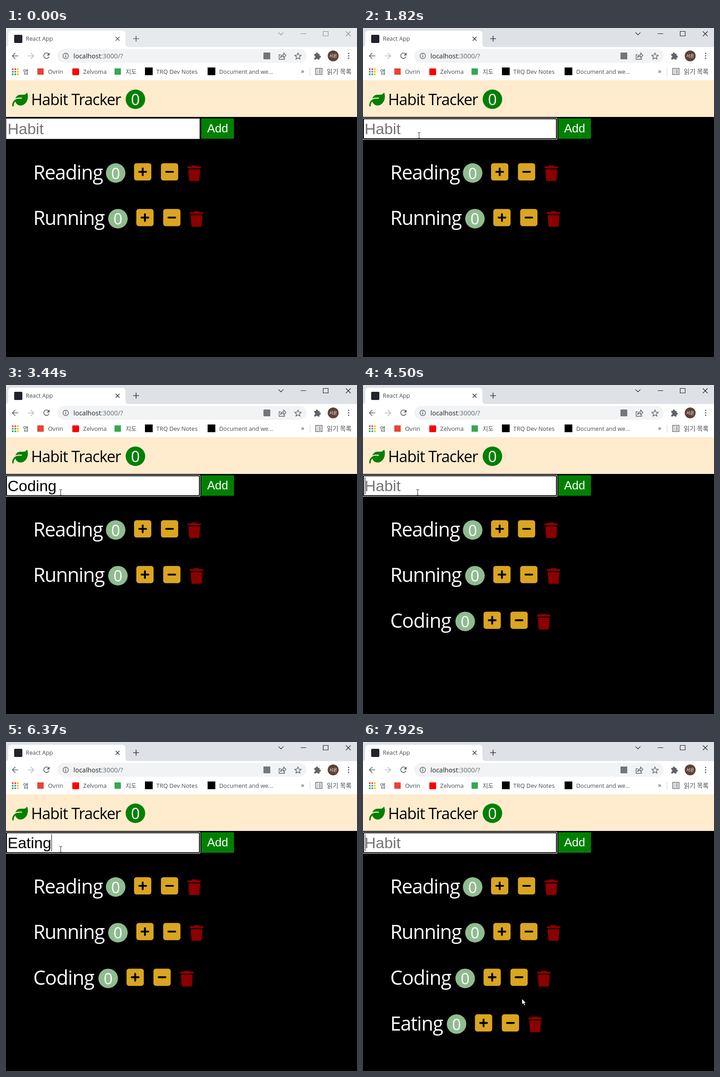
These frames come from a looping animation (773 px wide and 725 px high, 7990 ms). An HTML page:

```html
<!DOCTYPE html>
<html lang="ko">
<head>
<meta charset="utf-8">
<title>Habit Tracker</title>
<style>
html, body { margin: 0; width: 100%; height: 100%; overflow: hidden; background: #000; }
svg { display: block; }
text { white-space: pre; }
.ui { font: 13px "Open Sans", "Noto Sans CJK KR", "Noto Sans CJK", sans-serif; fill: #474a4e; }
.app { font-family: "Open Sans", "Noto Sans", sans-serif; }
.form { font-family: "Liberation Sans", Arial, sans-serif; }
.line { fill: none; stroke: #5f6368; stroke-width: 1.7; }
.thin { stroke-width: 1.4; }
</style>
</head>
<body>
<svg width="773" height="725" viewBox="0 0 773 725">
  <defs>
    <g id="tools">
      <rect x="40.5" y="-21.5" width="38" height="38" rx="5.4" fill="#daa520"/>
      <rect x="99.7" y="-21.5" width="38" height="38" rx="5.4" fill="#daa520"/>
      <path d="M52-2.5h15M59.5-10v15M111.2-2.5h15" stroke="#000" stroke-width="4.1" stroke-linecap="round"/>
      <path transform="translate(158 -16.7) scale(.0675)" fill="#8b0000" d="M135 18L128 32H32C14 32 0 46 0 64S14 96 32 96H416c18 0 32-14 32-32s-14-32-32-32H320l-7-14C307 7 296 0 284 0H164c-12 0-23 7-29 18zM416 128H32L53 467c2 25 23 45 48 45H347c25 0 46-20 48-45z"/>
    </g>
  </defs>

  <rect width="773" height="725"/>

  <!-- tab strip -->
  <rect id="strip" width="773" height="43"/>
  <path fill="#fff" d="M0 42Q5 41 5 34V14Q5 6 13 6H255Q263 6 263 14V34Q263 42 271 42H773V115H0Z"/>
  <rect x="18" y="15" width="18" height="18" rx="2" fill="#20232a"/>
  <text class="ui" x="43.5" y="28" style="font-size:12.8px">React App</text>
  <path id="tabIcons" class="line" d="M241.5 19.5l8.5 8.5m0-8.5l-8.5 8.5M280 23.5h13M286.5 17v13"/>
  <path id="winIcons" class="line" style="stroke-width:1.1" d="M600 9.8l5.5 5.4 5.5-5.4M649 12.5h12M698.5 7.5h11v10h-11zM748.5 7.5l10.5 10.5m0-10.5l-10.5 10.5"/>

  <!-- address bar -->
  <path class="line" d="M27 61.5H14M20.5 55l-6.5 6.5 6.5 6.5"/>
  <path class="line" style="stroke:#babcbe" d="M48 61.5h13M54.5 55l6.5 6.5-6.5 6.5"/>
  <path class="line" d="M94 57.5a6 6 0 1 0 .8 5.5"/>
  <path fill="#5f6368" d="M96 54v6.5h-6.5z"/>
  <rect x="113" y="46" width="549" height="30.5" rx="15.2" fill="#f1f3f4"/>
  <circle class="line thin" cx="131.5" cy="61.5" r="6"/>
  <path class="line" d="M131.5 60.5V65M131.5 57.8v1.7"/>
  <text class="ui" x="148.5" y="67" style="font-size:14.5px;fill:#202124">localhost<tspan fill="#686c70">:3000/?</tspan></text>
  <rect x="567" y="54" width="15" height="15" rx="1" fill="#73777b"/>
  <path class="line thin" d="M605 59h-3.5v10h12v-3M604.5 65.5q1-6.5 7-6.5v-4l5 5.5-5 5.3V62q-4.5 0-7 3.5z"/>
  <path class="line thin" d="M643 55l2 4.7 5.2.5-4 3.4 1.2 5-4.4-2.7-4.4 2.7 1.2-5-4-3.4 5.2-.5z"/>
  <path fill="#5f6368" d="M679 57h3.5a2.3 2.3 0 1 1 4.4 0h3.6v4a2.3 2.3 0 1 1 0 4.4v4h-4a2.2 2.2 0 0 0-4.3 0H679v-4a2.2 2.2 0 0 0 0-4.4z"/>
  <circle cx="720.5" cy="61.5" r="12" fill="#5d4037"/>
  <text class="ui" x="720.5" y="65" text-anchor="middle" style="font-size:9.5px;fill:#fff">서온</text>
  <path d="M754.5 56h0M754.5 61.3h0M754.5 66.6h0" stroke="#5f6368" stroke-width="3.2" stroke-linecap="round"/>

  <!-- bookmarks -->
  <g id="dots"></g>
  <rect x="69" y="89" width="14" height="14" fill="#ea4335"/>
  <rect x="146" y="89" width="15" height="15" rx="2" fill="#f00"/>
  <rect x="239" y="89" width="14" height="14" fill="#34a853"/>
  <path d="M306 87h17v17h-17zM444 87h17v17h-17z"/>
  <g class="ui">
    <text x="37.5" y="100.5">앱</text>
    <text x="92.5" y="101">Ovrin</text>
    <text x="170" y="101">Zelvoma</text>
    <text x="263.5" y="100.5">지도</text>
    <text x="331" y="101">TRQ Dev Notes</text>
    <text x="469.5" y="101" style="font-size:12.7px">Document and we...</text>
    <text x="649.5" y="100" style="font-size:15px">»</text>
    <text x="706.5" y="100.5" style="font-size:13.8px">읽기 목록</text>
  </g>
  <path d="M669.5 88v17" stroke="#cdd0d3"/>
  <path class="line thin" d="M682 89h14v13.5h-14zM684.5 92.5h2M688.5 92.5h5M684.5 95.8h2M688.5 95.8h5M684.5 99h2M688.5 99h5"/>

  <!-- page -->
  <rect y="115" width="773" height="81" fill="#ffebcd"/>
  <path fill="#008000" transform="translate(13.7 140.6) scale(.0674)" d="M272 96c-79 0-145 51-168 122c34-17 72-26 112-26h88c9 0 16 7 16 16s-7 16-16 16H216c-17 0-33 2-48 5c-26 6-50 17-72 31C38 299 0 365 0 440v16c0 13 11 24 24 24s24-11 24-24V440c0-49 21-92 54-123C122 392 190 448 272 448h1c132-1 239-131 239-291c0-43-7-83-21-120c-3-7-13-7-16 0C456 72 419 96 376 96z"/>
  <text class="app" x="55.2" y="170" font-size="34" letter-spacing="-.92">Habit Tracker</text>
  <circle cx="285" cy="157" r="21.5" fill="#008000"/>
  <text class="app" x="285" y="169.8" font-size="34" text-anchor="middle" fill="#fff">0</text>
  <rect id="idle" x=".5" y="199.5" width="426" height="45" fill="#fff"/>
  <g id="focus">
    <rect x="-1" y="198" width="429" height="48" rx="2.5" fill="#fff"/>
    <rect y="199" width="427" height="46" rx="2"/>
    <rect x="2" y="201" width="423" height="42" rx="1" fill="#fff"/>
  </g>
  <text id="field" class="form" x="3.5" y="234" font-size="34"></text>
  <rect id="caret" y="203" width="1" height="38"/>
  <rect x="430" y="199" width="72" height="45" fill="#008000"/>
  <text class="form" x="443" y="230" font-size="26" fill="#fff">Add</text>
  <g id="rows"></g>

  <!-- pointers -->
  <path id="beam" fill="none" stroke="#222" d="M-3-6h2.5l.5.5.5-.5H3M0-5.5V6M-3 6.5h2.5l.5-.5.5.5H3"/>
  <path id="arrow" fill="#fff" stroke="#000" stroke-width=".7" d="M0 0V12.5L3 9.8 5.2 14.7 7.4 13.7 5.3 9H9Z"/>
</svg>
<script>
const LOOP = 7990;
const FOCUS = 1280;
const $ = id => document.getElementById(id);
const show = (el, on) => el.setAttribute("display", on ? "inline" : "none");
const mix = (a, b, k) => a + (b - a) * k;

// name, badge centre, letter spacing, time of appearance
const habits = [
  ["Reading", 241.5, -1.25, 0],
  ["Running", 246.5, -1.4, 0],
  ["Coding", 225, -1, 3510],
  ["Eating", 206, -1.35, 6700]
];

// time, field content
const typing = [
  [0, ""], [1970, "C"], [2250, "Co"], [2500, "Cod"], [2630, "Codi"], [2760, "Codin"], [2890, "Coding"],
  [3510, ""], [5310, "E"], [5510, "Ea"], [5970, "Eat"], [6100, "Eati"], [6300, "Eatin"], [6370, "Eating"],
  [6700, ""]
];

// the caret switches on and off in turn
const blinks = [1280, 1820, 1970, 3440, 3510, 3970, 4500, 4980, 5310, 6960, 7440];

$("rows").innerHTML = habits.map(([name, cx, gap], i) => {
  const cy = 319.5 + i * 100.7;
  return `<g class="app" fill="#fff">
    <text x="59.9" y="${cy + 14}" font-size="43" letter-spacing="${gap}">${name}</text>
    <circle cx="${cx}" cy="${cy}" r="21.5" fill="#8fbc8f"/>
    <text x="${cx}" y="${cy + 13}" font-size="34" text-anchor="middle">0</text>
    <use href="#tools" x="${cx}" y="${cy}"/></g>`;
}).join("");

const hues = ["#ea4335", "#ea4335", "#fbbc04", "#34a853", "#4285f4", "#fbbc04", "#34a853", "#34a853", "#fbbc04"];
$("dots").innerHTML = hues.map((c, i) =>
  `<rect x="${13 + i % 3 * 5.6}" y="${89 + Math.floor(i / 3) * 5.6}" width="3.6" height="3.6" fill="${c}"/>`).join("");

function pointer(t) {
  if (t < 530) return null;
  if (t < 2040) {
    const k = Math.min(1, Math.floor((t - 530) / 70) / 7);
    const e = 1 - (1 - k) ** 2;
    return [mix(365, 123, e), mix(603, 236, e)];
  }
  if (t < 7370) return [120, 236];
  const k = Math.min(1, (Math.floor((t - 7370) / 78.5) + 1) / 8);
  const e = k * k * (3 - 2 * k);
  return [mix(120, 350, e), mix(236, 566, e)];
}

function draw(t) {
  const active = t >= FOCUS;
  $("strip").setAttribute("fill", active ? "#dee1e6" : "#e7eaed");
  $("winIcons").style.stroke = active ? "#1c1c1c" : "#8b8d8f";
  $("tabIcons").style.stroke = active ? "#3c4043" : "#5f6368";
  show($("idle"), !active);
  show($("focus"), active);

  const text = typing.filter(s => s[0] <= t).pop()[1];
  const field = $("field");
  field.textContent = text || "Habit";
  field.setAttribute("fill", text ? "#000" : "#757575");
  const width = text ? field.getComputedTextLength() : 0;
  $("caret").setAttribute("x", Math.floor(4 + width));
  show($("caret"), blinks.filter(b => b <= t).length % 2);

  habits.forEach((h, i) => show($("rows").children[i], t >= h[3]));

  const p = pointer(t);
  const inField = p && p[1] > 198 && p[1] < 245;
  $("idle").setAttribute("stroke", inField ? "#555" : "#767676");
  show($("beam"), inField);
  show($("arrow"), p && !inField);
  if (p) {
    const [x, y] = p.map(Math.round);
    $("beam").setAttribute("transform", `translate(${x + .5} ${y + .5})`);
    $("arrow").setAttribute("transform", `translate(${x} ${y})`);
  }
}

const start = performance.now();
function tick() {
  draw((performance.now() - start) % LOOP);
  requestAnimationFrame(tick);
}
tick();
</script>
</body>
</html>
```
